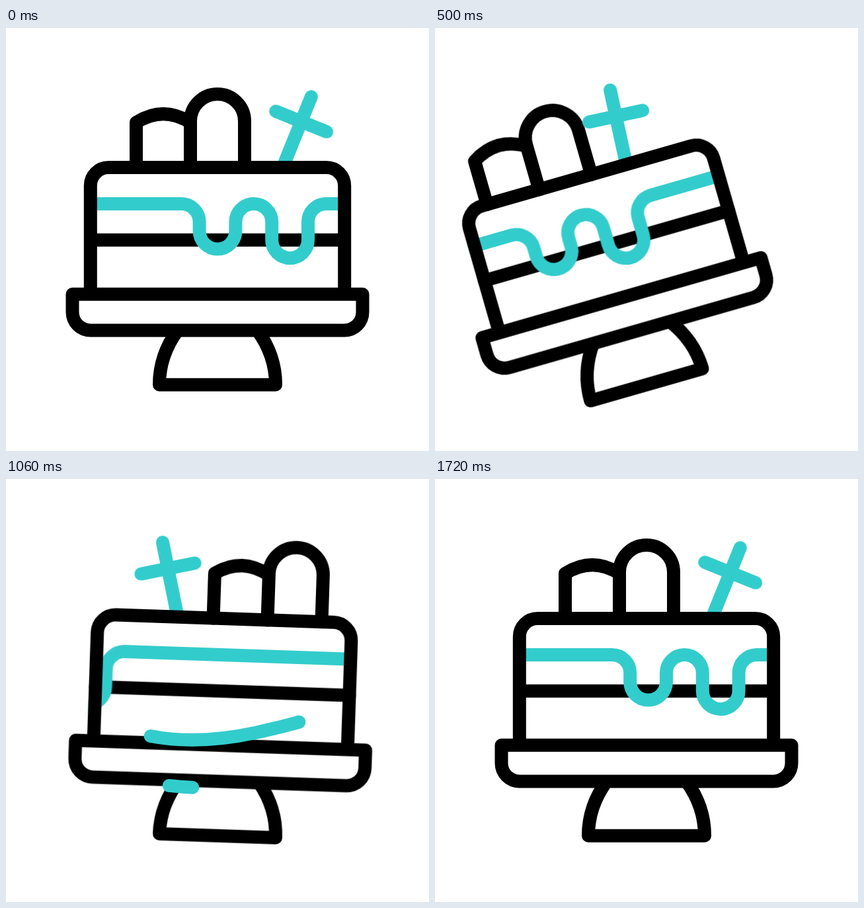
Animation of 640x640 px, one loop 2.4 s. Source, as an HTML page without scripts:

```html
<!DOCTYPE html>
<html lang="en">
<head>
<meta charset="utf-8">
<title>Spinning cake</title>
<style>
  html, body { margin: 0; width: 100%; height: 100%; overflow: hidden; background: #fff; }
  svg { display: block; width: 100%; height: 100%; fill: none; stroke: #000; stroke-width: 20; stroke-linecap: round; stroke-linejoin: round; }
  .teal { stroke: #33cccc; }
  .solid { fill: #fff; }

  .cake, .drip, .fingers, .cross, .streak {
    animation: 2400ms cubic-bezier(.333, 0, .667, 1) infinite;
  }
  .cake { animation-name: tilt; transform-origin: 320px 540px; }
  .drip { animation-name: flow; }
  .fingers { animation-name: sway; }
  .front { animation-name: orbit, lean, in-front; }
  .back { animation-name: orbit, lean, behind; }
  .upper { animation-name: upper; animation-timing-function: linear; }
  .lower { animation-name: lower; animation-timing-function: linear; }

  /* the wind-up leg starts a touch faster than the rest */
  @keyframes tilt {
    0% { transform: rotate(0deg); animation-timing-function: cubic-bezier(.31, 0, .66, 1); }
    20% { transform: rotate(-16.2deg); }
    36.667% { transform: rotate(8deg); }
    51.667% { transform: rotate(-4deg); }
    63.333% { transform: rotate(1.9deg); }
    71.667%, 100% { transform: rotate(0deg); }
  }
  @keyframes flow {
    0% { transform: translateX(0); animation-timing-function: cubic-bezier(.31, 0, .66, 1); }
    20% { transform: translateX(-80px); }
    67.5%, 100% { transform: translateX(572px); }
  }
  @keyframes sway {
    0% { transform: translateX(0); animation-timing-function: cubic-bezier(.31, 0, .66, 1); }
    20% { transform: translateX(-34px); }
    49.167% { transform: translateX(117px); }
    67.5%, 100% { transform: translateX(0); }
  }
  @keyframes orbit {
    0% { translate: 419.7px 208.3px; animation-timing-function: cubic-bezier(.31, 0, .66, 1); }
    20% { translate: 382px 208.3px; }
    33.333% { translate: 445px 208.3px; }
    49.167% { translate: 188px 208.3px; }
    67.5%, 100% { translate: 419.7px 208.3px; }
  }
  @keyframes lean {
    0% { rotate: 22deg; animation-timing-function: cubic-bezier(.31, 0, .66, 1); }
    20% { rotate: 3.4deg; }
    33.333% { rotate: 34deg; }
    49.167% { rotate: -27.7deg; }
    66.667%, 100% { rotate: 22deg; }
  }
  @keyframes in-front {
    0%, 49.167%, 100% { visibility: visible; animation-timing-function: step-end; }
    33.333% { visibility: hidden; animation-timing-function: step-end; }
  }
  @keyframes behind {
    0%, 49.167%, 100% { visibility: hidden; animation-timing-function: step-end; }
    33.333% { visibility: visible; animation-timing-function: step-end; }
  }

  /* dash length = head - tail, offset = -tail */
  .streak { visibility: hidden; }
  @keyframes upper {
    0%, 31.66% { visibility: hidden; stroke-dasharray: 0 300; stroke-dashoffset: 0; }
    31.67% { visibility: visible; stroke-dasharray: 0 300; stroke-dashoffset: 0; }
    34.17% { stroke-dasharray: 5.5 300; stroke-dashoffset: 0; }
    36.67% { stroke-dasharray: 21 300; stroke-dashoffset: 0; }
    40% { stroke-dasharray: 42 300; stroke-dashoffset: -4.6; }
    43.33% { stroke-dasharray: 57.6 300; stroke-dashoffset: -16.5; }
    46.25% { stroke-dasharray: 61.5 300; stroke-dashoffset: -31; }
    49.17% { stroke-dasharray: 52.4 300; stroke-dashoffset: -47.6; }
    51.67% { stroke-dasharray: 38 300; stroke-dashoffset: -62; }
    55% { stroke-dasharray: 20.4 300; stroke-dashoffset: -79.6; }
    58.75% { stroke-dasharray: 5.7 300; stroke-dashoffset: -94.3; }
    62.5% { visibility: visible; stroke-dasharray: 0 300; stroke-dashoffset: -100; }
    62.51%, 100% { visibility: hidden; stroke-dasharray: 0 300; stroke-dashoffset: -100; }
  }
  @keyframes lower {
    0%, 36.9% { visibility: hidden; stroke-dasharray: 0 300; stroke-dashoffset: 0; }
    36.91% { visibility: visible; stroke-dasharray: 0 300; stroke-dashoffset: 0; }
    40% { stroke-dasharray: 2.7 300; stroke-dashoffset: -3.4; }
    43.33% { stroke-dasharray: 9 300; stroke-dashoffset: -12.6; }
    46.67% { stroke-dasharray: 17 300; stroke-dashoffset: -26; }
    51.67% { stroke-dasharray: 26 300; stroke-dashoffset: -52; }
    55% { stroke-dasharray: 25 300; stroke-dashoffset: -67; }
    59.17% { stroke-dasharray: 15.6 300; stroke-dashoffset: -84.4; }
    63.33% { stroke-dasharray: 3.5 300; stroke-dashoffset: -96.5; }
    66.67% { visibility: visible; stroke-dasharray: 0 300; stroke-dashoffset: -100; }
    66.68%, 100% { visibility: hidden; stroke-dasharray: 0 300; stroke-dashoffset: -100; }
  }
</style>
</head>
<body>
<svg viewBox="0 0 640 640">
  <defs>
    <path id="cross" d="M0 0V-112.5M-41.5-72H41.5"/>
    <path id="wave" d="M-85 266H265.2a27.4 27.4 0 0 1 27.4 27.4v13.7a27.4 27.4 0 0 0 54.8 0v-13.7a27.4 27.4 0 0 1 54.8 0v27.4a27.4 27.4 0 0 0 54.8 0v-27.4a27.4 27.4 0 0 1 27.4-27.4H490"/>
    <clipPath id="side"><rect x="118" y="211" width="404" height="192"/></clipPath>
  </defs>

  <g class="cake">
    <use class="cross back teal" href="#cross"/>
    <g class="fingers solid">
      <path d="M197 211V143Q238 117 279 143V211"/>
      <path d="M279 211V141a41 41 0 0 1 82 0V211"/>
    </g>
    <use class="cross front teal" href="#cross"/>

    <path d="M128 320.7H512"/>
    <g clip-path="url(#side)">
      <g class="drip teal">
        <use href="#wave" x="-569.4"/>
        <use href="#wave"/>
        <use href="#wave" x="569.4"/>
      </g>
    </g>
    <path d="M127.8 403V238.5a27.4 27.4 0 0 1 27.4-27.4H484.8a27.4 27.4 0 0 1 27.4 27.4V403"/>

    <path d="M260 457Q232 495 232 539.7H408Q408 495 380 457"/>
    <path class="solid" d="M100.5 402.8H539.5V430a27.4 27.4 0 0 1-27.4 27.4H127.9a27.4 27.4 0 0 1-27.4-27.4Z"/>
  </g>

  <path class="streak upper teal" pathLength="100" d="M144 359C169 375 190 383 219 389C270 399 325 395 377 384C435 371 487 358 516 338"/>
  <path class="streak lower teal" pathLength="100" d="M196 455C250 468 310 470 361 464C390 461 418 456 443 450C470 443 492 432 507 420"/>
</svg>
</body>
</html>
```
